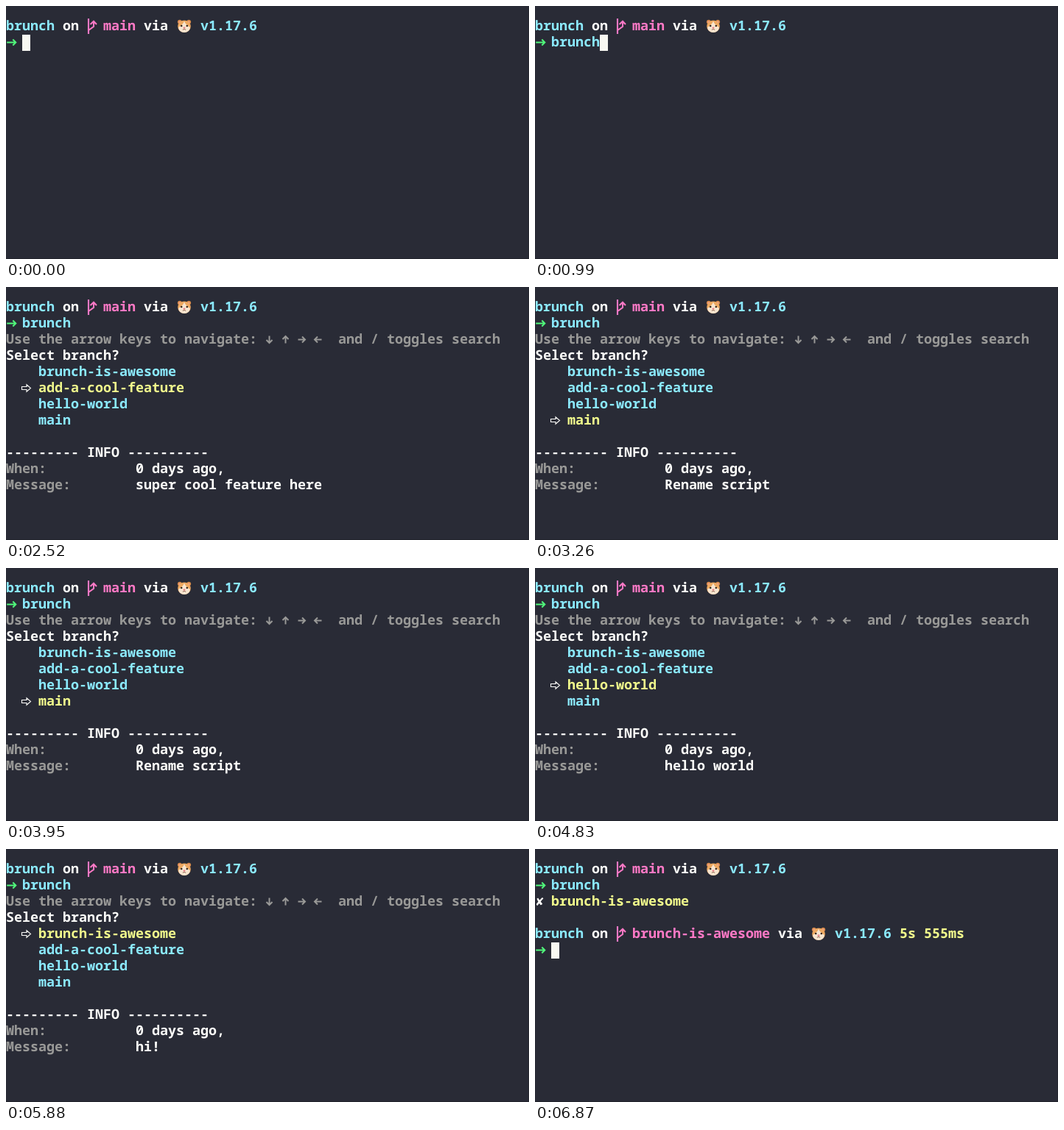
These frames come from a looping animation (710 px wide and 344 px high, 7870 ms). An HTML page:

```html
<!DOCTYPE html>
<html lang="en">
<head>
<meta charset="utf-8">
<title>Branch picker in a terminal</title>
<style>
html, body { margin: 0; width: 100%; height: 100%; overflow: hidden; background: #292b36; }
svg { display: block; }
text {
  font: 600 18.333px "Noto Sans Mono", "DejaVu Sans Mono", monospace;
  font-variant-ligatures: none;
  text-rendering: geometricPrecision;
}
</style>
</head>
<body>
<svg id="term" width="710" height="344" viewBox="0 0 710 344"></svg>
<script>
const LOOP = 7870, COL = 11, ROW = 22;
const CYAN = '#8be9fd', PINK = '#ff79c6', GREEN = '#50fa7b', YELLOW = '#f1fa8c',
      WHITE = '#fdfdfa', GREY = '#999997';
const term = document.getElementById('term');

const branches = [
  ['brunch-is-awesome', 'hi!'],
  ['add-a-cool-feature', 'super cool feature here'],
  ['hello-world', 'hello world'],
  ['main', 'Rename script']
];
const keyTimes = [240, 410, 490, 650, 810, 900];
const picks = [[1300, 0], [2520, 1], [2930, 2], [3260, 3], [4830, 2], [5150, 1], [5400, 0]];
const MENU = 1300, CHOSEN = 6800, DONE = 6870;

const text = (col, row, str, fill) =>
  `<text x="${col * COL}" y="${33 + row * ROW}" fill="${fill}">${str}</text>`;

const at = (col, row, shapes) =>
  `<g transform="translate(${col * COL} ${17 + row * ROW})">${shapes}</g>`;

const cursor = (col, row) => at(col, row, `<path d="M0 0h11v22h-11z" fill="#f8f8f2"/>`);

const arrow = (x, row, turn, fill, half = 5) =>
  `<path transform="translate(${x} ${28 + row * ROW - 0.5}) rotate(${turn})" fill="none" stroke="${fill}"
    stroke-width="2" d="M${-half} 0H${half - 1}M${half - 4.5} -4L${half - 0.5} 0L${half - 4.5} 4"/>`;

const branchIcon = (col, row) => at(col, row,
  `<path fill="none" stroke="${PINK}" stroke-width="2.1"
    d="M2 0V21M2 16L9 11V4.5M4.5 8L9 3.8L13 8"/>`);

const hamster = (col, row) => at(col, row,
  `<g fill="#d98c4a"><circle cx="4.8" cy="4.6" r="2.9"/><circle cx="17.2" cy="4.6" r="2.9"/></g>
   <g fill="#f2a5a0"><circle cx="4.9" cy="4.8" r="1.4"/><circle cx="17.1" cy="4.8" r="1.4"/></g>
   <ellipse cx="11" cy="10.8" rx="8.8" ry="8.2" fill="#eda961"/>
   <path d="M11 3.5Q13 9 19 12Q18 19 11 19Q4 19 3 12Q9 9 11 3.5Z" fill="#f8e6d0"/>
   <g fill="#35271f"><circle cx="7.2" cy="10" r="1.3"/><circle cx="14.8" cy="10" r="1.3"/></g>
   <ellipse cx="11" cy="12.4" rx="1.5" ry="1" fill="#e4707c"/>
   <path d="M8.8 15Q10.2 15.6 11 14Q11.8 15.6 13.2 15" fill="none" stroke="#7a4a35" stroke-width=".8"/>`);

function prompt(row, branch, took = '') {
  const end = 13 + branch.length;
  return text(0, row, 'brunch', CYAN) + text(7, row, 'on', WHITE) + branchIcon(10, row) +
    text(12, row, branch, PINK) + text(end, row, 'via', WHITE) + hamster(end + 4, row) +
    text(end + 7, row, 'v1.17.6', CYAN) + text(end + 15, row, took, YELLOW) +
    arrow(7.5, row + 1, 0, GREEN, 6.3);
}

function menu(pick) {
  const y = 28 + (4 + pick) * ROW - 0.5;
  return text(0, 2, 'Use the arrow keys to navigate:', GREY) +
    [90, -90, 0, 180].map((turn, i) => arrow(357.5 + i * 2 * COL, 2, turn, GREY)).join('') +
    text(41, 2, 'and / toggles search', GREY) +
    text(0, 3, 'Select branch?', WHITE) +
    branches.map(([name], i) => text(4, 4 + i, name, i === pick ? YELLOW : CYAN)).join('') +
    `<path d="M21.5 ${y - 2}h6.5v-2.7l5.5 4.7l-5.5 4.7v-2.7h-6.5z" fill="none" stroke="${WHITE}" stroke-width="1.1"/>` +
    text(0, 9, '--------- INFO ----------', WHITE) +
    text(0, 10, 'When:', GREY) + text(16, 10, '0 days ago,', WHITE) +
    text(0, 11, 'Message:', GREY) + text(16, 11, branches[pick][1], WHITE);
}

function result(done) {
  const name = branches[0][0];
  return `<text x="0" y="76.5" fill="${WHITE}" style="font:15px 'DejaVu Sans',sans-serif">✘</text>` +
    text(2, 2, name, YELLOW) +
    (done ? prompt(4, name, '5s 555ms') + cursor(2, 5) : '');
}

function scene(t) {
  const typed = keyTimes.filter(k => t >= k).length;
  let out = prompt(0, 'main') + text(2, 1, 'brunch'.slice(0, typed), CYAN);
  if (t < MENU) out += cursor(2 + typed, 1);
  else if (t < CHOSEN) out += menu(picks.filter(p => t >= p[0]).pop()[1]);
  else out += result(t >= DONE);
  return out + '<path d="M709.5 0V343.5H0" fill="none" stroke="#22242d"/>';
}

const start = performance.now();
let shown = '';
function draw() {
  const next = scene((performance.now() - start) % LOOP);
  if (next !== shown) term.innerHTML = shown = next;
  requestAnimationFrame(draw);
}
draw();
</script>
</body>
</html>
```
